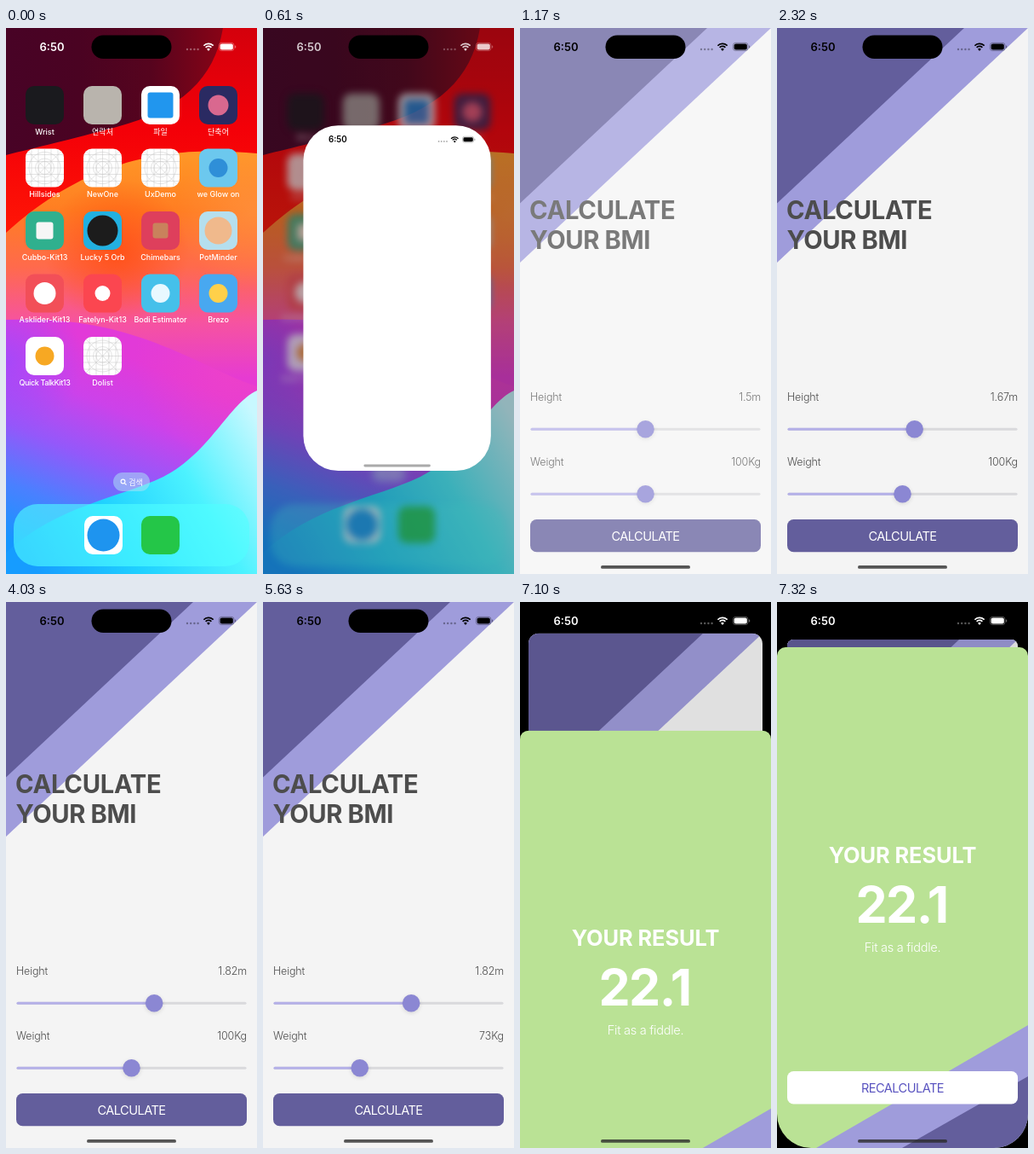
Recreate the animation shown at these times as an HTML page with a canvas. Size 295 by 640 pixels, loop 8 s.

```html
<!DOCTYPE html>
<html lang="ko">
<head>
<meta charset="utf-8">
<title>BMI</title>
<style>
html, body { margin: 0; width: 100%; height: 100%; overflow: hidden; background: #000; }
canvas { display: block; width: 295px; height: 640px; }
</style>
</head>
<body>
<canvas id="stage"></canvas>
<script>
const W = 295, H = 640, LOOP = 8000;
const stage = document.getElementById('stage');
const ratio = window.devicePixelRatio || 1;
stage.width = W * ratio;
stage.height = H * ratio;
let c = stage.getContext('2d');

const DARK = '#635e9c', LIGHT = '#9f9cdb', INK = '#4d4d4d';

const TICKS = [0, 500, 610, 720, 830, 940, 1060, 1170, 1280, 1480, 1890, 2100, 2210, 2320,
  2420, 2520, 2660, 2770, 2880, 3130, 3230, 3550, 3700, 3820, 4030, 4990, 5100, 5200, 5310,
  5410, 5630, 6620, 6770, 6880, 6990, 7100, 7210, 7320];
const HEIGHT_KEYS = [[2010, 1.5], [2320, 1.67], [2520, 1.76], [2880, 1.83], [3230, 1.85],
  [3550, 1.845], [3820, 1.835], [4030, 1.82]];
const WEIGHT_KEYS = [[4900, 100], [5200, 80], [5410, 73]];

const lerp = (a, b, p) => a + (b - a) * p;
const clamp = v => Math.max(0, Math.min(1, v));
const spring = x => x <= 0 ? 0 : 1 - (1 + x) * Math.exp(-x);

function track(keys, t) {
  if (t <= keys[0][0]) return keys[0][1];
  for (let i = 1; i < keys.length; i++) {
    const [t0, a] = keys[i - 1], [t1, b] = keys[i];
    if (t <= t1) return lerp(a, b, (t - t0) / (t1 - t0));
  }
  return keys[keys.length - 1][1];
}

function box(x, y, w, h, r, fill) {
  c.beginPath();
  c.roundRect(x, y, w, h, r);
  if (fill) { c.fillStyle = fill; c.fill(); }
}

function disc(x, y, r, fill) {
  c.beginPath();
  c.arc(x, y, r, 0, 7);
  c.fillStyle = fill;
  c.fill();
}

function poly(fill, ...pts) {
  c.beginPath();
  for (let i = 0; i < pts.length; i += 2) c.lineTo(pts[i], pts[i + 1]);
  c.fillStyle = fill;
  c.fill();
}

function shape(d, fill) {
  c.fillStyle = fill;
  c.fill(new Path2D(d));
}

function ramp(x0, y0, x1, y1, ...stops) {
  const g = c.createLinearGradient(x0, y0, x1, y1);
  stops.forEach((s, i) => g.addColorStop(i / (stops.length - 1), s));
  return g;
}

function glow(x, y, r, rgb, a) {
  const g = c.createRadialGradient(x, y, 0, x, y, r);
  g.addColorStop(0, `rgba(${rgb},${a})`);
  g.addColorStop(1, `rgba(${rgb},0)`);
  c.fillStyle = g;
  c.fillRect(x - r, y - r, r * 2, r * 2);
}

function text(s, x, y, size, weight, fill, align = 'left', gap = 0) {
  c.font = `${weight} ${size}px Inter, "Noto Sans CJK KR", "Noto Sans CJK", sans-serif`;
  c.letterSpacing = gap + 'px';
  c.textAlign = align;
  c.fillStyle = fill;
  c.fillText(s, x, y);
}

// Status bar, island and home indicator

function statusBar(col) {
  text('6:50', 54, 26.6, 13, 600, col, 'center');
  c.save();
  c.globalAlpha *= .35;
  for (let i = 0; i < 4; i++) disc(213 + i * 4.2, 25, 1.2, col);
  c.restore();
  c.strokeStyle = col;
  c.lineWidth = 1.7;
  for (const r of [4.6, 7.7]) {
    c.beginPath();
    c.arc(238, 26, r, -Math.PI * .76, -Math.PI * .24);
    c.stroke();
  }
  c.beginPath();
  c.moveTo(238, 27);
  c.arc(238, 26.6, 2.6, -Math.PI * .76, -Math.PI * .24);
  c.fillStyle = col;
  c.fill();
  c.save();
  c.globalAlpha *= .4;
  c.lineWidth = .8;
  box(250.4, 17.4, 17.6, 9.2, 3);
  c.stroke();
  box(269, 20.4, 1.2, 3.2, .6, col);
  c.restore();
  box(251.6, 18.6, 15.2, 6.8, 2, col);
}

const island = () => box(100.5, 8.5, 94, 27.5, 13.75, '#000');
const indicator = col => box(95, 630, 105, 3.8, 1.9, col);

// Home screen

function wallpaper() {
  c.fillStyle = ramp(0, 600, 95, 365, '#1596ff', '#4a80ff', '#9458fa', '#cc42ea', '#e23ad8');
  c.fillRect(0, 0, W, H);
  glow(0, 390, 90, '150,75,255', .7);
  glow(270, 390, 120, '246,70,190', .6);
  shape('M0 0H295V420C220 395 150 335 0 342Z',
    ramp(0, 150, 0, 410, '#ff9626', '#ff7d22', '#ff6a4c', '#f653a0', '#e63bd2'));
  glow(130, 262, 85, '255,72,10', .75);
  glow(290, 215, 90, '255,150,70', .6);
  shape('M0 0H295V147C215 140 110 140 0 240Z', ramp(0, 0, 0, 240, '#d4000c', '#f40008', '#ff1606'));
  shape('M0 0H255C245 60 205 96 130 116C75 131 35 140 0 149Z',
    ramp(0, 0, 255, 0, '#480326', '#4a0322', '#56041e', '#880416'));
  shape('M295 425C262 440 240 498 185 526C130 552 60 560 0 615V640H295Z',
    ramp(20, 610, 290, 450, '#169cff', '#1fd0ff', '#4cf2ff', '#c8f8ff'));
}

function grid(x, y) {
  c.save();
  box(x, y, 45, 45, 10);
  c.clip();
  c.strokeStyle = '#c4c4c4';
  c.lineWidth = .5;
  c.beginPath();
  for (const k of [7, 15, 22.5, 30, 38]) {
    c.moveTo(x + k, y); c.lineTo(x + k, y + 45);
    c.moveTo(x, y + k); c.lineTo(x + 45, y + k);
  }
  c.moveTo(x, y); c.lineTo(x + 45, y + 45);
  c.moveTo(x + 45, y); c.lineTo(x, y + 45);
  for (const r of [7.5, 11, 18.5]) {
    c.moveTo(x + 22.5 + r, y + 22.5);
    c.arc(x + 22.5, y + 22.5, r, 0, 7);
  }
  c.stroke();
  c.restore();
}

// label, tile colour, mark: grid, or colour with radius (negative for a square)
const APPS = [
  ['Wrist', '#1a1a1e'], ['연락처', '#b9b4ad'], ['파일', '#fff', '#2196ee', -15], ['단축어', '#2a2a62', '#d9688f', 12],
  ['Hillsides', '#fff', 'grid'], ['NewOne', '#fff', 'grid'], ['UxDemo', '#fff', 'grid'], ['we Glow on', '#6cc8ee', '#2f8fd8', 11],
  ['Cubbo-Kit13', '#2fb08e', '#f6f6f6', -10], ['Lucky 5 Orb', '#22b0e0', '#1c1c1c', 18], ['Chimebars', '#de3f5c', '#c9825c', -9], ['PotMinder', '#b5dfee', '#f0b98c', 16],
  ['Asklider-Kit13', '#f24f58', '#fff', 13], ['Fatelyn-Kit13', '#fb4650', '#fff', 9], ['Bodi Estimator', '#45c0ea', '#e8f8ff', 11], ['Brezo', '#48a8f0', '#ffd04a', 11],
  ['Quick TalkKit13', '#fff', '#f7a823', 11], ['Dolist', '#fff', 'grid']
];

function icon(x, y, tile, mark, r) {
  box(x, y, 45, 45, 10, tile);
  if (mark === 'grid') grid(x, y);
  else if (r > 0) disc(x + 22.5, y + 22.5, r, mark);
  else if (r < 0) box(x + 22.5 + r, y + 22.5 + r, -2 * r, -2 * r, 3, mark);
}

function icons() {
  APPS.forEach(([name, tile, mark, r], i) => {
    const x = 23 + i % 4 * 68, y = 68 + Math.floor(i / 4) * 73.5;
    icon(x, y, tile, mark, r);
    text(name, x + 22.5, y + 56.8, 9, 500, '#fff', 'center', name.length > 14 ? -.4 : 0);
  });
  box(126, 521, 43, 22, 11, 'rgba(170,225,245,.55)');
  c.strokeStyle = '#fff';
  c.lineWidth = 1.1;
  c.beginPath();
  c.arc(137.5, 531.5, 2.4, 0, 7);
  c.moveTo(139.3, 533.3);
  c.lineTo(141.5, 535.5);
  c.stroke();
  text('검색', 152.5, 535.5, 9, 500, '#fff', 'center');
}

function dock() {
  box(9, 558, 277, 73, 28, 'rgba(80,255,255,.6)');
}

function dockIcons() {
  icon(92, 572, '#fff', '#1e94ef', 19);
  icon(159, 572, '#24c648');
}

function layer(draw) {
  const cv = document.createElement('canvas');
  cv.width = W * ratio;
  cv.height = H * ratio;
  const main = c;
  c = cv.getContext('2d');
  c.scale(ratio, ratio);
  draw();
  c = main;
  return cv;
}

const wallLayer = layer(wallpaper);
const dockLayer = layer(dock);
const iconLayer = layer(() => { icons(); dockIcons(); });

function home(p) {
  c.drawImage(wallLayer, 0, 0, W, H);
  c.save();
  if (p > .01) c.filter = `blur(${6 * p * ratio}px)`;
  c.globalAlpha = 1 - .7 * p;
  c.drawImage(dockLayer, 0, 0, W, H);
  c.globalAlpha = 1 - .3 * p;
  const s = 1 - .057 * p;
  c.translate(160, 285);
  c.scale(s, s);
  c.drawImage(iconLayer, -160, -285, W, H);
  c.restore();
  c.fillStyle = `rgba(18,18,22,${.42 * p})`;
  c.fillRect(0, 0, W, H);
  c.save();
  c.globalAlpha = 1 - .3 * p;
  statusBar('#fff');
  c.restore();
}

function launch(p, q) {
  const w = lerp(45, W, p), h = lerp(45, H, q);
  const x = lerp(181.5, W / 2, p) - w / 2, y = lerp(311.5, H / 2, q) - h / 2;
  const s = w / W;
  c.save();
  c.globalAlpha = clamp(p * 3);
  box(x, y, w, h, Math.min(lerp(10, 61, p), 41), '#fff');
  c.clip();
  c.translate(x, y);
  c.scale(s, s);
  statusBar('#000');
  c.translate(0, h / s - H);
  indicator('#aaa');
  c.restore();
}

// App pages

function slider(y, part) {
  const x = 22.5 + 250 * part;
  box(12.5, y - 1.5, 270, 3, 1.5, '#d9d9dc');
  box(12.5, y - 1.5, x - 12.5, 3, 1.5, '#b4b0e8');
  c.save();
  c.shadowColor = 'rgba(0,0,0,.12)';
  c.shadowBlur = 5 * ratio;
  c.shadowOffsetY = 1.5 * ratio;
  disc(x, y, 10.3, '#8b87d3');
  c.restore();
}

function button(y, h, fill, label, col) {
  box(12, y, 271, h, 7.5, fill);
  text(label, W / 2, y + h / 2 + 5.6, 14.6, 400, col, 'center', -.55);
}

function inputPage(t) {
  const tall = track(HEIGHT_KEYS, t), mass = track(WEIGHT_KEYS, t);
  c.fillStyle = '#f4f4f4';
  c.fillRect(0, 0, W, H);
  poly(LIGHT, 0, 0, 295, 0, 0, 275);
  poly(DARK, 0, 0, 220, 0, 0, 205.5);
  text('CALCULATE', 11, 223.5, 29.2, 700, INK, 'left', -.3);
  text('YOUR BMI', 11.5, 259, 29.2, 700, INK, 'left', -.4);
  const row = (y, name, value) => {
    text(name, 12, y, 12.5, 300, INK, 'left', -.15);
    text(value, 283, y, 12.5, 300, INK, 'right', -.15);
  };
  row(437.3, 'Height', (tall === 1.5 ? '1.5' : tall.toFixed(2)) + 'm');
  slider(470.3, tall / 3);
  row(513.3, 'Weight', mass.toFixed(0) + 'Kg');
  slider(546.3, mass / 200);
  const pressed = t >= 6620 && t < 6770;
  button(576, 38.3, DARK, 'CALCULATE', pressed ? 'rgba(255,255,255,.3)' : '#fff');
}

function resultPage() {
  box(0, 53, W, 587, [10, 10, 40, 40]);
  c.clip();
  c.fillStyle = '#bae295';
  c.fillRect(0, 53, W, 587);
  poly(LIGHT, 295, 496, 295, 640, 46, 640);
  poly(DARK, 295, 556, 295, 640, 147, 640);
  text('YOUR RESULT', W / 2, 305.8, 25.4, 700, '#fff', 'center', -.1);
  text('22.1', W / 2 - 1, 375.5, 59, 700, '#fff', 'center', -1.5);
  text('Fit as a fiddle.', W / 2, 409.8, 14.6, 300, '#fff', 'center', -.3);
  button(550, 38.5, '#fff', 'RECALCULATE', '#5a54c0');
}

function app(t) {
  const p = spring((t - 6780) * .0094) / spring(540 * .0094);
  c.fillStyle = '#000';
  c.fillRect(0, 0, W, H);
  c.save();
  if (p > 0) {
    const s = 1 - 24 / W * p;
    c.translate(12 * p, 44 * p);
    c.scale(s, s);
    box(0, 0, W, H, lerp(39, 8, p));
    c.clip();
  }
  inputPage(t);
  c.fillStyle = `rgba(0,0,0,${.1 * p})`;
  c.fillRect(0, 0, W, H);
  c.restore();
  if (p > 0) {
    c.save();
    c.translate(0, 587 * (1 - p));
    resultPage();
    c.restore();
  }
  const veil = clamp((1220 - t) / 200);
  c.fillStyle = `rgba(255,255,255,${veil})`;
  c.fillRect(0, 0, W, H);
  const g = Math.round(255 * clamp((p - .3) / .4));
  statusBar(`rgb(${g},${g},${g})`);
  indicator(p > 0 ? 'rgba(40,40,40,.78)' : '#555');
}

function draw(t) {
  c.setTransform(ratio, 0, 0, ratio, 0, 0);
  const p = spring((t - 490) * .0204), q = spring((t - 490) * .017);
  if (p > .99) app(t);
  else {
    home(p);
    if (p > 0) launch(p, q);
  }
  island();
}

const start = performance.now();
let shown = -1;
function tick() {
  const now = (performance.now() - start) % LOOP;
  const t = TICKS.findLast(k => k <= now);
  if (t !== shown) draw(shown = t);
  requestAnimationFrame(tick);
}
tick();
</script>
</body>
</html>
```
